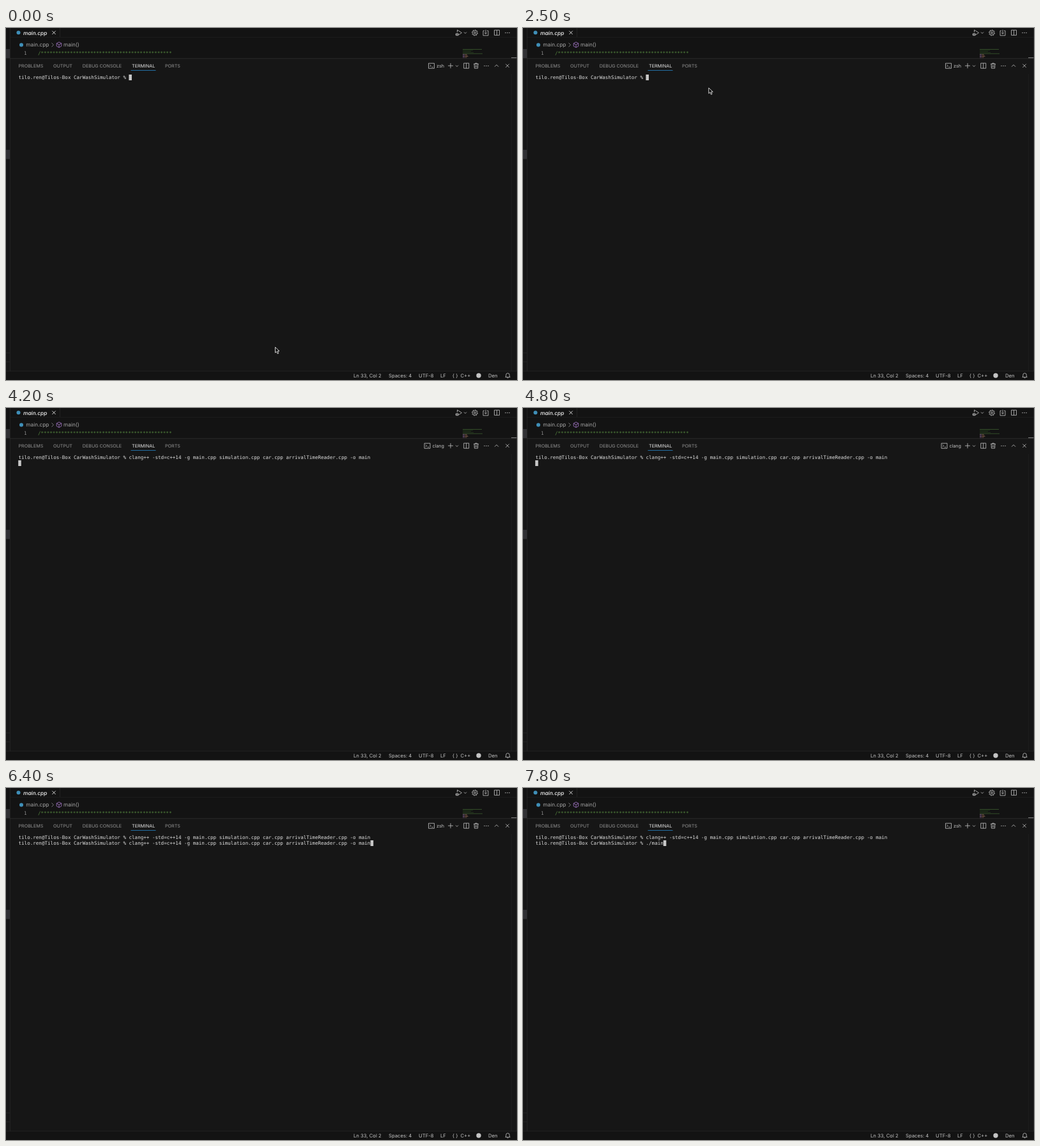
Write an HTML page with a canvas that moves like this. It is 800x552 px and loops after 8 s.

```html
<!DOCTYPE html>
<html lang="en">
<head>
<meta charset="utf-8">
<title>Terminal build</title>
<style>
html, body { margin: 0; width: 100%; height: 100%; overflow: hidden; background: #161616; }
canvas { display: block; width: 800px; height: 552px; }
</style>
</head>
<body>
<canvas id="stage"></canvas>
<script>
const W = 800, H = 552, LOOP = 8000, STEP = 100;
const UI = 'Inter, "Open Sans", sans-serif';
const MONO = '"DejaVu Sans Mono", "Liberation Mono", monospace';
const MONO_SIZE = 7.57, CELL = MONO_SIZE * 0.602, LINE = 9;
const PROMPT = 'tilo.ren@Tilos-Box CarWashSimulator % ';
const BUILD = 'clang++ -std=c++14 -g main.cpp simulation.cpp car.cpp arrivalTimeReader.cpp -o main';
const GREY = '#c4c4c4', DIM = '#929292', EDGE = '#292929';

// Terminal states: start time, running process, visible lines
const STATES = [
  [0, 'zsh', [PROMPT]],
  [3000, 'zsh', [PROMPT + BUILD]],
  [3800, 'clang', [PROMPT + BUILD, '']],
  [6200, 'zsh', [PROMPT + BUILD, PROMPT]],
  [6400, 'zsh', [PROMPT + BUILD, PROMPT + BUILD]],
  [6700, 'zsh', [PROMPT + BUILD, PROMPT + './main']]
];

// Pointer path: time, x, y
const POINTER = [
  [0, 421, 500], [800, 421, 500], [1200, 345, 323], [1300, 345, 323],
  [1500, 310, 246.5], [1700, 304, 234], [1900, 304, 234], [2600, 288, 70], [3000, 288, 70]
];

const canvas = document.getElementById('stage');
const ctx = canvas.getContext('2d');
const ratio = window.devicePixelRatio || 1;
canvas.width = W * ratio;
canvas.height = H * ratio;

function text(s, x, y, size, color, font = UI, style = '', align = 'left') {
  ctx.font = `${style} ${size}px ${font}`;
  ctx.textAlign = align;
  ctx.fillStyle = color;
  ctx.fillText(s, x, y);
}

function rect(x, y, w, h, color) {
  ctx.fillStyle = color;
  ctx.fillRect(x, y, w, h);
}

function dot(x, y, r, color) {
  ctx.fillStyle = color;
  ctx.beginPath();
  ctx.arc(x, y, r, 0, Math.PI * 2);
  ctx.fill();
}

function icon(x, y, d, color = GREY, width = 0.8) {
  ctx.save();
  ctx.translate(x, y);
  ctx.strokeStyle = color;
  ctx.lineWidth = width;
  ctx.stroke(new Path2D(d));
  ctx.restore();
}

const CROSS = 'M-2.7-2.7L2.7 2.7M2.7-2.7L-2.7 2.7';
const CHEVRON_RIGHT = 'M-1.5-3L1.5 0L-1.5 3';
const CHEVRON_DOWN = 'M-2-1L0 1L2-1';
const CHEVRON_UP = 'M-3 1.5L0-1.5L3 1.5';
const SPLIT = 'M-4-4H4V4H-4ZM0-4V4';
const SHELL = 'M-4.5-4H4.5V4H-4.5ZM-2.6-1.8L-.8 0L-2.6 1.8M.4 2H2.6';
const TRASH = 'M-4-2.8H4M-1.4-2.8V-4H1.4V-2.8M-3-2.8L-2.6 4H2.6L3-2.8M-1-1V2.4M1-1V2.4';
const PLAY = 'M-2.5-1V-4.5L4.5 0L0 3';
const BUG = 'M-4.5 1.2H-1V4.2H-4.5ZM-5.4 2.7H0';
const TRAY = 'M-2-3.5H-4V4H4V-3.5H2M0-5V1.5M-2-.5L0 1.5L2-.5';
const CUBE = 'M0-4.2L3.8-2.2V2.2L0 4.2L-3.8 2.2V-2.2ZM-3.8-2.2L0 0L3.8-2.2M0 0V4.2';
const BELL = 'M-3.6 2.5H3.6L2.7 1V-1A2.7 2.7 0 0 0-2.7-1V1ZM-1 3.8H1';

function dots(x, y) {
  for (let i = -1; i <= 1; i++) dot(x + i * 3, y, 0.7, GREY);
}

function gear(x, y) {
  let d = 'M1.4 0A1.4 1.4 0 1 1-1.4 0A1.4 1.4 0 1 1 1.4 0Z';
  for (let i = 0; i < 32; i++) {
    const a = (i + 0.5) / 32 * Math.PI * 2;
    const r = i % 4 < 2 ? 4.5 : 3.3;
    d += `${i ? 'L' : 'M'}${(r * Math.cos(a)).toFixed(2)} ${(r * Math.sin(a)).toFixed(2)}`;
  }
  icon(x, y, d + 'Z', GREY, 0.9);
}

function drawMinimap() {
  for (let i = 0; i < 5; i++) {
    const w = [30, 16, 13, 17, 31][i];
    rect(715, 33 + i * 1.7, w, 0.7, i % 4 ? '#27431f' : '#416632');
  }
  for (let i = 0; i < 4; i++) {
    rect(715, 41.2 + i * 1.5, 3, 0.8, '#71547a');
    rect(718.5, 41.2 + i * 1.5, 3 + i % 3, 0.8, '#805c4a');
  }
}

function drawEditor() {
  rect(0, 0, W, 48, '#131313');
  rect(6, 14, W - 6, 0.6, '#202020');
  rect(84, 0, 0.7, 14, EDGE);
  dot(19.5, 7.3, 3, '#3f8fb8');
  text('main.cpp', 27, 10.5, 8.35, '#f4f4f4', UI, 'italic 500');
  icon(75, 7.3, CROSS, '#e0e0e0', 0.9);

  icon(709, 7.5, PLAY);
  icon(709, 7.5, BUG);
  icon(719, 7.5, CHEVRON_DOWN);
  gear(734, 7.5);
  icon(751, 7.8, TRAY);
  icon(768.5, 7.3, SPLIT);
  dots(785, 7.5);

  dot(24, 26.5, 3, '#3f8fb8');
  text('main.cpp', 31.3, 29.4, 8.3, '#a6a6a6');
  icon(73, 26.5, CHEVRON_RIGHT, '#969696');
  icon(83, 26.3, CUBE, '#a779cc');
  text('main()', 90, 29.4, 8.3, '#a6a6a6');

  text('1', 28, 42.2, MONO_SIZE, '#8a8a8a', MONO);
  text('/' + '*'.repeat(45), 50, 42.2, MONO_SIZE, '#55873f', MONO);
  drawMinimap();
  rect(791, 46, 9, 1.3, '#777');
}

function drawPanel(process) {
  rect(6, 47.5, W - 6, 0.8, '#303030');
  const tabs = [['PROBLEMS', 19.5], ['OUTPUT', 74], ['DEBUG CONSOLE', 119.7], ['TERMINAL', 197], ['PORTS', 249]];
  for (const [name, x] of tabs) {
    text(name, x, 61.9, 7.18, name === 'TERMINAL' ? '#e4e4e4' : DIM);
  }
  rect(195.5, 66, 39, 0.9, '#2479b3');

  icon(process === 'zsh' ? 666 : 659.5, 59.3, SHELL);
  text(process, 686, 62, 7.2, GREY, UI, '', 'right');
  icon(696, 59.2, 'M-4 0H4M0-4V4');
  icon(706, 59.5, CHEVRON_DOWN);
  icon(720.7, 59.2, SPLIT);
  icon(736, 59.2, TRASH);
  dots(752, 59.4);
  icon(768, 59.2, CHEVRON_UP);
  icon(785, 59.2, CROSS);
}

function drawFrame() {
  rect(0, 33, 6, 14.5, '#303033');
  rect(0, 191, 6, 14.5, '#303033');
  rect(0, 509, 6, 0.6, EDGE);
  rect(0, 523, 6, 0.6, EDGE);
  rect(6, 0, 0.7, 538, EDGE);
  rect(791, 72, 0.6, 466, '#222');
  rect(799, 0, 0.7, 538, EDGE);
}

function drawStatus() {
  rect(0, 538, W, 14, '#131313');
  rect(0, 537.7, W, 0.7, EDGE);
  const items = [['Ln 33, Col 2', 544], ['Spaces: 4', 599], ['UTF-8', 646], ['LF', 680], ['{ }', 698.8], ['C++', 711.5], ['Den', 755]];
  for (const [label, x] of items) text(label, x, 547.8, 7.7, GREY);
  dot(740, 545, 3.7, GREY);
  icon(785.5, 545, BELL);
}

function drawTerminal(lines) {
  lines.forEach((line, i) => text(line, 19.5, 79.9 + i * LINE, MONO_SIZE, '#dedede', MONO));
  const last = lines.length - 1;
  rect(19.5 + lines[last].length * CELL - 0.3, 73 + last * LINE, CELL, LINE, '#c8c8c8');
}

function drawPointer(t) {
  const i = POINTER.findIndex(p => p[0] > t);
  if (i < 1) return;
  const a = POINTER[i - 1], b = POINTER[i];
  const k = (t - a[0]) / (b[0] - a[0]);
  ctx.save();
  ctx.translate(a[1] + (b[1] - a[1]) * k, a[2] + (b[2] - a[2]) * k);
  const arrow = new Path2D('M.5.5V9.2L2.6 7.3L4.1 10.8L5.7 10.1L4.2 6.7H7Z');
  ctx.fillStyle = '#090909';
  ctx.fill(arrow);
  ctx.strokeStyle = '#e8e8e8';
  ctx.lineWidth = 0.9;
  ctx.stroke(arrow);
  ctx.restore();
}

function draw(now) {
  const t = Math.floor((now % LOOP) / STEP) * STEP;
  const [, process, lines] = STATES.filter(s => s[0] <= t).pop();
  ctx.setTransform(ratio, 0, 0, ratio, 0, 0);
  ctx.textRendering = 'geometricPrecision';
  ctx.lineJoin = 'round';
  rect(0, 0, W, H, '#161616');
  drawEditor();
  drawPanel(process);
  drawFrame();
  drawStatus();
  drawTerminal(lines);
  drawPointer(t);
}

const start = performance.now();
function tick() {
  draw(performance.now() - start);
  requestAnimationFrame(tick);
}
tick();
</script>
</body>
</html>
```
